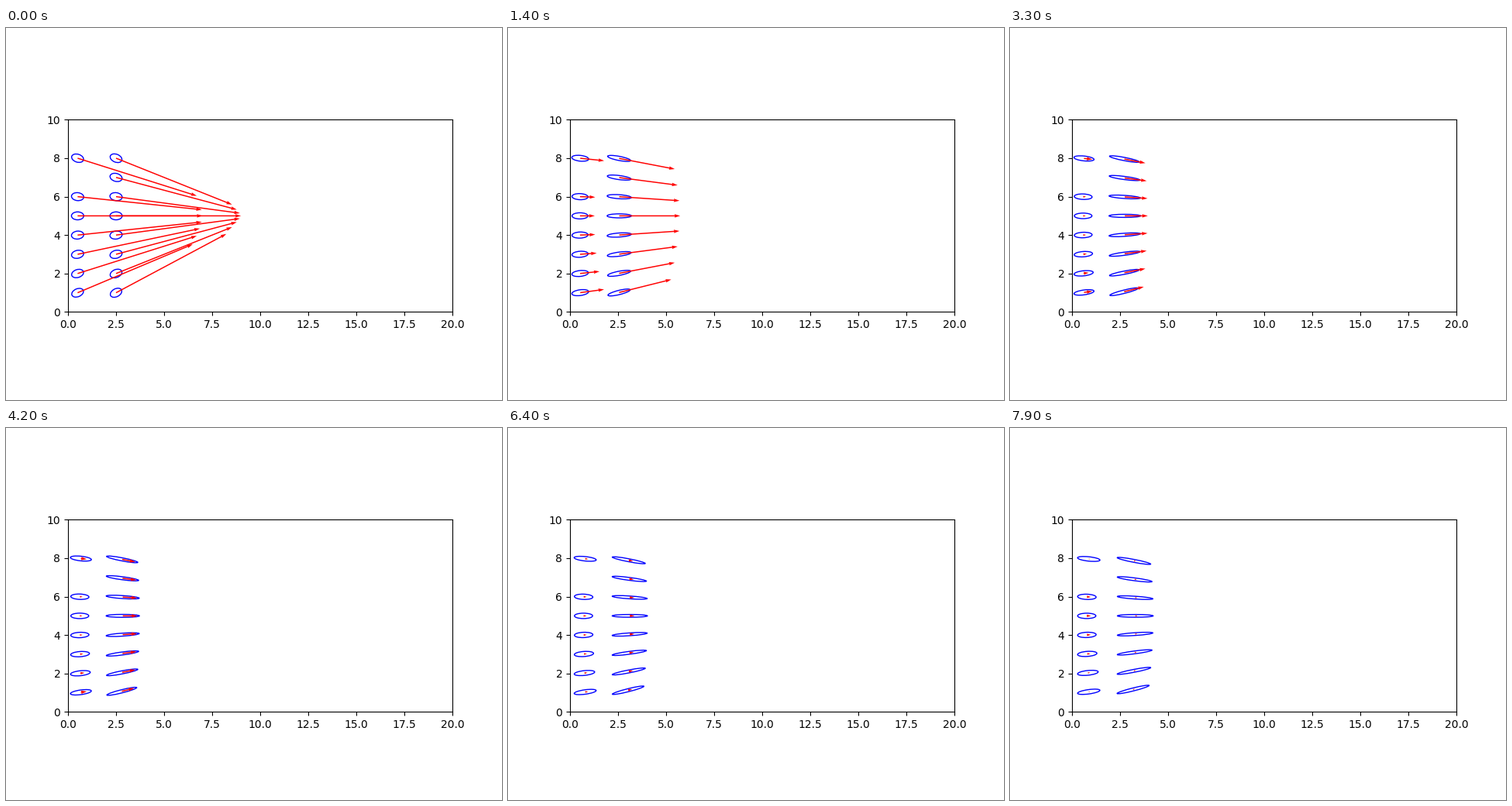
A matplotlib script that plays this animation: 640x480 px, repeating every 8000 ms.

```python
import numpy as np
import matplotlib.pyplot as plt
from matplotlib.animation import FuncAnimation
from matplotlib.patches import Ellipse

FRAMES, STEP_MS = 80, 100
GOAL = np.array([10.0, 5.0])
FORCE = 6.5
AREA = 0.066  # product of the semi-axes, kept as cells stretch

home = np.array([(0.5, y) for y in (1, 2, 3, 4, 5, 6, 8)]
                + [(2.5, y) for y in range(1, 9)])
rear = home[:, 0] < 1
aim = np.arctan2(*(GOAL - home).T[::-1])
cos_aim = np.cos(aim)

# 0 in the middle of the rear column, 1 at its two ends
edge = np.minimum(np.abs(home[:, 1] - 5) / 4, 1) ** 2
edge[rear & (home[:, 1] == 8)] = 1

KEYS = (0, 14, 25, 33, 52, 64, 79)
MID_FORCE = np.log((6.5, 0.77, 0.28, 0.14, 0.13, 0.16, 0.22))
END_FORCE = np.log((6.5, 1.25, 0.66, 0.44, 0.21, 0.155, 0.07))


def mix(a, b):
    return a + (b - a) * edge


def travel(n, speed, tau):
    """Distance covered when speeding up from rest."""
    return speed * (n - tau * (1 - np.exp(-n / tau)))


def heading(n):
    rest = np.where(rear, 0.34, 0.5)
    swing = (1 - rest - 2.2 * n) * np.exp(-n / 1.5)
    return aim * (rest + swing), aim * rest


def force(n):
    back = np.exp(mix(np.interp(n, KEYS, MID_FORCE), np.interp(n, KEYS, END_FORCE)))
    front = FORCE * 0.95 ** n * (cos_aim + (1 - cos_aim) * np.exp(-n / 2))
    return np.where(rear, back, front)


def half_length(n):
    back = mix(0.155, 0.275) * (1 - np.exp(-n / mix(15, 24)))
    front = 0.62 * cos_aim * (1 - np.exp(-n / 20))
    return 0.32 + np.where(rear, back, front)


def distance(n):
    back = mix(travel(n, 0.0043, 17), travel(n, 0.0055, 11))
    return np.where(rear, back, travel(n, 0.0122, 14) * cos_aim)


fig, ax = plt.subplots(figsize=(6.4, 4.8), dpi=100)
ax.set_aspect("equal")
ax.set_xlim(0, 20)
ax.set_ylim(0, 10)

cells = [ax.add_patch(Ellipse(p, 0.5, 0.5, fill=False, ec="b", lw=1)) for p in home]
arrows = ax.quiver(*home.T, np.ones(len(home)), np.zeros(len(home)), color="r",
                   units="width", width=0.003, scale_units="width", scale=20)


def update(n):
    turn, course = heading(n)
    pos = home + distance(n)[:, None] * np.column_stack((np.cos(course), np.sin(course)))
    a = half_length(n)
    for cell, p, half, ang in zip(cells, pos, a, np.degrees(turn)):
        cell.set_center(p)
        cell.set_width(2 * half)
        cell.set_height(2 * AREA / half)
        cell.set_angle(ang)
    pull = force(n)
    arrows.set_offsets(pos)
    arrows.set_UVC(pull * np.cos(turn), pull * np.sin(turn))
    return [*cells, arrows]


anim = FuncAnimation(fig, update, frames=FRAMES, interval=STEP_MS,
                     repeat=True, repeat_delay=0)
plt.show()
```
